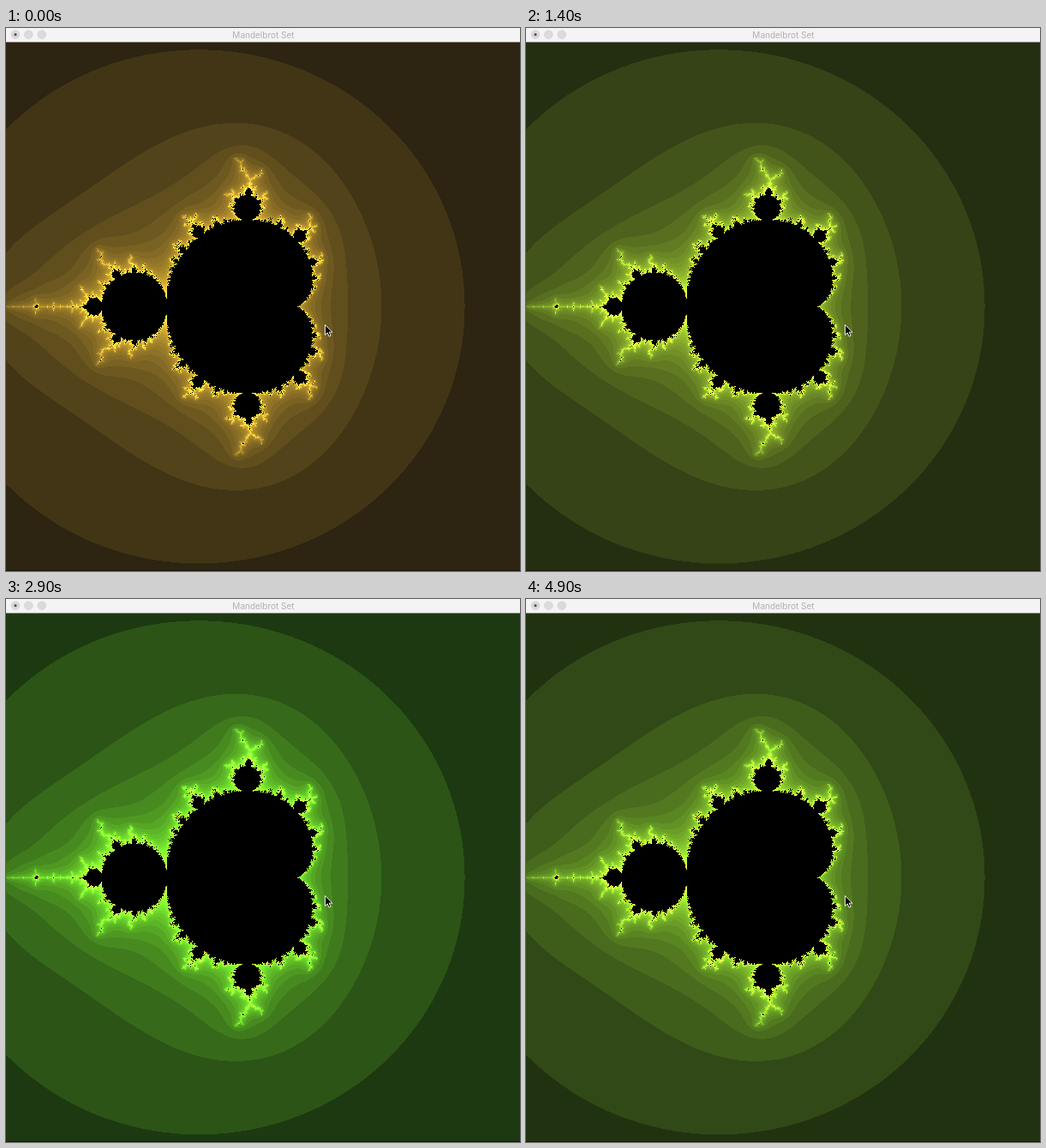
Recreate the animation shown at these times as an HTML page with a canvas. Size 600 px wide and 634 px high, loop 5000 ms.

```html
<!DOCTYPE html>
<html lang="en">
<head>
<meta charset="utf-8">
<style>
html, body { margin: 0; width: 100%; height: 100%; overflow: hidden; background: #1c160c; }
canvas, svg { position: absolute; left: 0; top: 0; display: block; }
</style>
</head>
<body>
<canvas width="600" height="634"></canvas>
<svg width="600" height="634">
  <rect width="600" height="16.5" fill="#f5f3f5"/>
  <g fill="#dcdadc" stroke="#cfcdcf" stroke-width=".7">
    <circle cx="11" cy="7.7" r="4.8"/>
    <circle cx="26.3" cy="7.7" r="4.8"/>
    <circle cx="41.7" cy="7.7" r="4.8"/>
  </g>
  <circle cx="11" cy="7.7" r="1.6" fill="#555"/>
  <text x="300.5" y="11.8" text-anchor="middle" font-family="Inter, sans-serif" font-size="10" fill="#b1afb1">Mandelbrot Set</text>
  <path d="M372.5 346.5v11.8l2.7-2.5 1.9 4.3 2-.9-1.9-4.1h3.7z" fill="#000" stroke="#fff" stroke-width=".9"/>
</svg>
<script>
const W = 600, H = 634, TOP = 16, BOTTOM = 633, LIMIT = 50;
const LOOP = 5000, STEP = 100, TURN = 3400;
const ctx = document.querySelector('canvas').getContext('2d');
const image = ctx.createImageData(W, H);
const pixels = new Uint32Array(image.data.buffer);
const counts = new Uint8Array(W * H);

// time, red and green of the third band
const KEYS = [
  [0, 83, 67], [600, 77, 72], [1000, 71, 78],
  [1900, 62, 92], [2900, 54, 105], [3100, 52, 112], [3400, 51, 115]
];

function escapeCount(a, b) {
  let x = a, y = b, n = 0;
  while (n < LIMIT && x * x + y * y <= 16) {
    [x, y] = [x * x - y * y + a, 2 * x * y + b];
    n++;
  }
  return n;
}

for (let y = TOP; y < BOTTOM; y++)
  for (let x = 0; x < W; x++)
    counts[y * W + x] = escapeCount((x + .5 - 300.5) / 150.5, (y + .5 - 325.3) / 154.9);

function tint(t) {
  const i = KEYS.findIndex((k, j) => j && t <= k[0]);
  const a = KEYS[i - 1], b = KEYS[i], u = (t - a[0]) / (b[0] - a[0]);
  return [1, 2].map(c => a[c] + (b[c] - a[c]) * u);
}

function draw(t) {
  const [red, green] = tint(t > TURN ? 2 * TURN - t : t);
  const palette = new Uint32Array(LIMIT + 1).fill(0xff000000);
  for (let n = 0; n < LIMIT; n++) {
    const f = (n / 3) ** .55;
    const r = Math.min(255, red * f), g = Math.min(255, green * f), b = 17 * n ** .4;
    palette[n] = (255 << 24 | b << 16 | g << 8 | r) >>> 0;
  }
  for (let i = TOP * W; i < BOTTOM * W; i++) pixels[i] = palette[counts[i]];
  ctx.putImageData(image, 0, 0);
}

let shown = -1;
const start = performance.now();
function tick() {
  const t = Math.floor((performance.now() - start) % LOOP / STEP) * STEP;
  if (t !== shown) draw(shown = t);
  requestAnimationFrame(tick);
}
tick();
</script>
</body>
</html>
```
